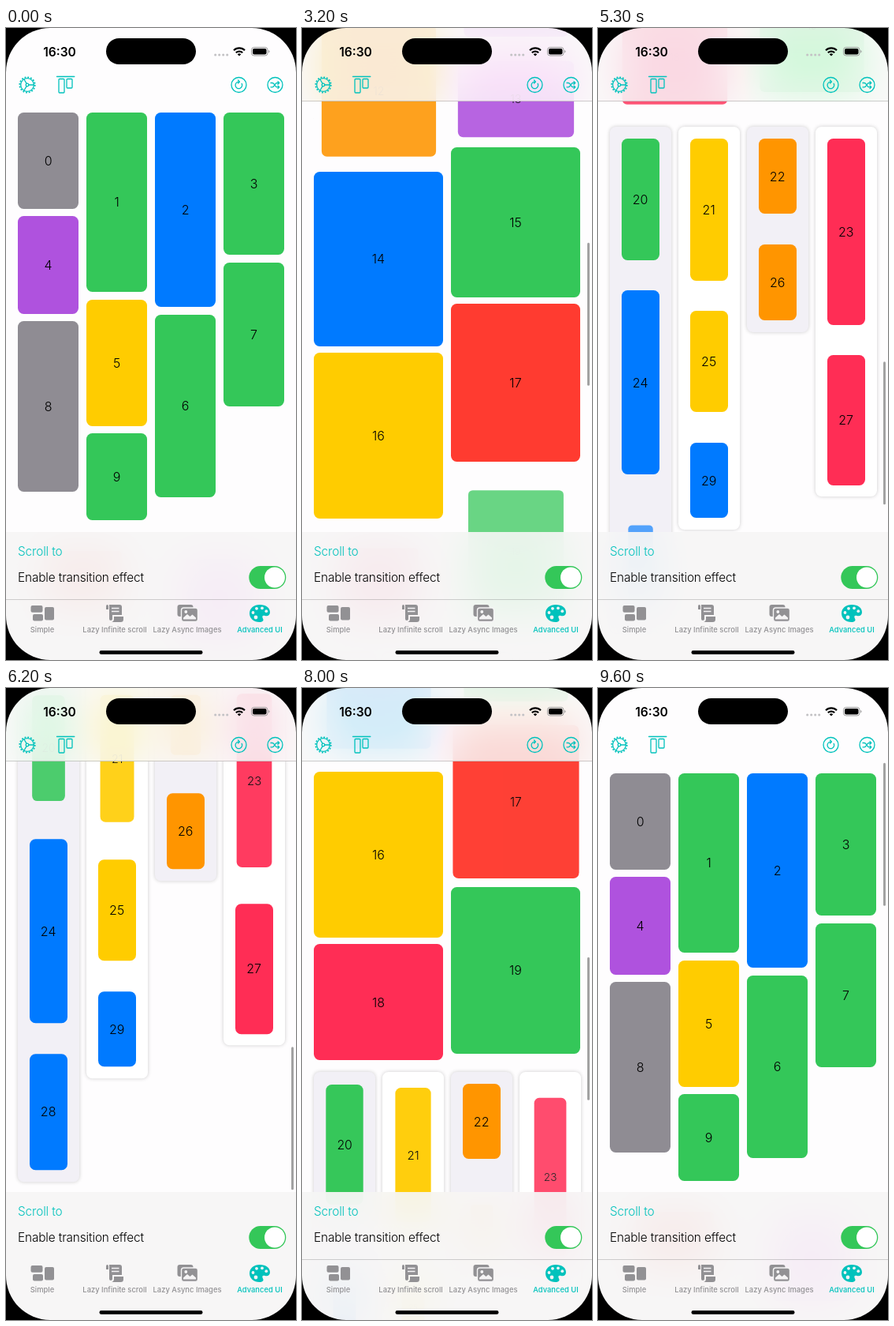
These frames come from a looping animation (368x800 px, 9700 ms). An HTML page:

```html
<!DOCTYPE html>
<html lang="en">
<head>
<meta charset="utf-8">
<title>Grid scroll</title>
<style>
  html, body { margin: 0; width: 100%; height: 100%; overflow: hidden; background: #000; }
  #phone { position: relative; width: 368px; height: 800px; overflow: hidden; background: #fefdfe;
    font: 300 16px Inter, "Liberation Sans", sans-serif; color: #000; }
  #phone > *, #list > * { position: absolute; box-sizing: border-box; }
  #list { left: 0; top: 0; }
  .tile { display: flex; align-items: center; justify-content: center; border-radius: 7.5px; }
  .card { border-radius: 7.5px; box-shadow: 0 0 5px rgba(0,0,0,.2); }
  .bar { left: 0; width: 368px; }
  #nav { top: 0; height: 92.5px; border-bottom: 1px solid rgba(0,0,0,.18); background: rgba(249,248,248,.85);
    -webkit-backdrop-filter: blur(26px) saturate(2.2); backdrop-filter: blur(26px) saturate(2.2); }
  #panel { top: 638px; height: 162px; background: rgba(247,246,246,.92);
    -webkit-backdrop-filter: blur(26px) saturate(1.8); backdrop-filter: blur(26px) saturate(1.8); }
  #line { left: 0; top: 723px; width: 368px; height: 1px; background: rgba(0,0,0,.17); }
  #thumb { left: 362.3px; top: 0; width: 3px; height: 181px; border-radius: 2px; background: rgba(0,0,0,.36); }
  #chrome { left: 0; top: 0; }
  #mask { inset: 0; border-radius: 56px; box-shadow: 0 0 0 60px #000; }
  .tab { font-size: 9.4px; font-weight: 500; text-anchor: middle; }
  .row { font-size: 15.4px; letter-spacing: -.15px; }
</style>
</head>
<body>
<div id="phone">
  <div id="list"></div>
  <div id="nav" class="bar"></div>
  <div id="panel" class="bar"></div>
  <div id="line"></div>
  <div id="thumb"></div>
  <svg id="chrome" width="368" height="800">
    <text x="68" y="35.5" font-size="15.6" font-weight="600" text-anchor="middle">16:30</text>
    <rect x="127" y="13" width="114" height="33" rx="16.5"/>
    <path d="M265.7 34h16" stroke="#c4c3c6" stroke-width="3.2" stroke-linecap="round" stroke-dasharray="0 5"/>
    <path d="M289 28.2a10 10 0 0 1 14 0M291.8 31.3a6 6 0 0 1 8.4 0" fill="none" stroke="#000" stroke-width="2.1"/>
    <path d="M293.7 33.2a3.4 3.4 0 0 1 4.6 0l-2.3 2.4z"/>
    <rect x="311.5" y="24.5" width="20.5" height="10.5" rx="3.2" fill="none" stroke="#999"/>
    <rect x="313" y="26" width="17.5" height="7.5" rx="2"/>
    <path d="M333.3 28v3.6q1.3-.6 1.3-1.8t-1.3-1.8" fill="#999"/>

    <g fill="none" stroke="#00c2bc" stroke-width="1.3" stroke-linecap="round" stroke-linejoin="round">
      <g transform="translate(27 72)">
        <circle r="8.3"/>
        <circle r="9.7" stroke-width="1.8" stroke-linecap="butt" stroke-dasharray="1.9 1.91"/>
        <circle r="1.8"/>
        <path d="M1.8 0H8M-.9-1.6-4-7M-.9 1.6-4 7"/>
      </g>
      <path d="M64.5 61.5h22.3"/>
      <rect x="67" y="64.5" width="7" height="17.5" rx="1"/>
      <rect x="77" y="64.5" width="7" height="11.5" rx="1"/>
      <g transform="translate(295.5 72)">
        <circle r="9.5"/>
        <path d="M3.7-1.6A4.3 4.3 0 1 1 .3-3.9M-1-6l2 2.1-2 2"/>
      </g>
      <g transform="translate(341.5 72)">
        <circle r="9.5"/>
        <path d="M-5.5-2.5h2C-.8-2.5-.3 2.8 2.3 2.8H5M-5.5 2.8h2C-.8 2.8-.3-2.5 2.3-2.5H5M3.5-4.3 5.3-2.5 3.5-.8M3.5 1.1 5.3 2.8 3.5 4.6"/>
      </g>
    </g>

    <text class="row" x="15" y="667.5" fill="#00c2bc">Scroll to</text>
    <text class="row" x="15" y="700.5">Enable transition effect</text>
    <rect x="308.3" y="681" width="47" height="29" rx="14.5" fill="#34c759"/>
    <circle cx="341" cy="695.5" r="13" fill="#fff"/>

    <g fill="#929194">
      <rect x="31.5" y="731" width="15" height="8.7" rx="2"/>
      <rect x="49" y="733" width="12" height="16.5" rx="2"/>
      <rect x="34" y="742" width="13" height="8.5" rx="2"/>
      <path d="M131 730h13q3 0 3 3v10h-12v5q0 2-2 2t-2-2zM127 732q0-2 1.5-2t1.5 2v4h-3zM137 745h12v3.5q0 3.5-3.5 3.5H134q3-1 3-4z"/>
      <path d="M134 734.5h9.5M134 738.5h9.5" stroke="#f5f4f5" stroke-width="1.4"/>
      <rect x="217.5" y="730" width="20" height="15" rx="3"/>
      <rect x="222.5" y="734" width="21" height="17.5" rx="3" stroke="#f5f4f5" stroke-width="1.4"/>
      <path d="M225 748.5v-2l5-4.5 3.5 3 3-2.5 4.5 4v2z" fill="#f5f4f5"/>
      <circle cx="228.3" cy="739" r="1.9" fill="#f5f4f5"/>
      <text class="tab" x="46" y="765.3">Simple</text>
      <text class="tab" x="138" y="765.3">Lazy Infinite scroll</text>
      <text class="tab" x="230" y="765.3">Lazy Async Images</text>
    </g>
    <g fill="#00c2bc">
      <path d="M322 730c8 0 13 4 13 9.5 0 4-3 5.5-6.5 4.5-3-.8-4 1-2.5 3.5 1.5 2.8-.5 4.500-4.500 4.500-7 0-12.500-4.500-12.500-11s5.500-11 13-11z"/>
      <g fill="#f5f4f5">
        <circle cx="313.5" cy="740" r="1.9"/><circle cx="318" cy="734.8" r="1.9"/>
        <circle cx="325" cy="734.3" r="1.9"/><circle cx="330.3" cy="738.2" r="1.9"/>
        <circle cx="317" cy="746" r="2.4"/>
      </g>
      <text class="tab" x="322" y="765.3">Advanced UI</text>
    </g>
    <rect x="118.5" y="788" width="131" height="4.7" rx="2.3"/>
  </svg>
  <div id="mask"></div>
</div>
<script>
const $ = id => document.getElementById(id);
const LOOP = 9700, TOP = 92, BOTTOM = 638, END = 2228;
const colors = { g: '#34c759', b: '#007aff', y: '#ffcc00', o: '#ff9500', r: '#ff3b30',
                 p: '#ff2d55', v: '#af52de', n: '#8f8c93' };
const sections = [
  { y: 106.6, cols: 4, x: 14.7, w: 77.8, pitch: 87, gap: 9.4, fill: 'ngbgvyggng',
    h: [122, 227.5, 246.5, 180.5, 123.5, 160, 231, 182.5, 216, 110.5] },
  { y: 638, cols: 2, x: 14.7, w: 164.6, pitch: 174, gap: 7.6, fill: 'rvovbgyrpg',
    h: [120, 171, 189.4, 107.5, 221.6, 190.4, 210.4, 200.2, 147.5, 211] },
  { y: 1587, cols: 4, x: 29.5, w: 48.3, pitch: 87, gap: 38.7, fill: 'gyopbyopbb', pad: 14.8,
    h: [153.5, 179.5, 95, 235.5, 233, 128, 96.5, 164.5, 147, 95.5] }
];
const tiles = [];

function box(cls, x, y, w, h, background) {
  const el = document.createElement('div');
  el.className = cls;
  Object.assign(el.style, { left: x + 'px', top: y + 'px', width: w + 'px', height: h + 'px', background });
  $('list').append(el);
  return el;
}

for (const { y, cols, x, w, pitch, gap, fill, pad, h } of sections) {
  const next = Array(cols).fill(y);
  const placed = h.map((height, i) => {
    const c = i % cols, top = next[c];
    next[c] += height + gap;
    return [x + c * pitch, top, w, height, colors[fill[i]]];
  });
  if (pad) next.forEach((bottom, c) => box('card', x + c * pitch - pad, y - pad, w + 2 * pad,
    bottom - gap - y + 2 * pad, c % 2 ? '#fff' : '#f2f0f6'));
  for (const p of placed) {
    const el = box('tile', ...p);
    el.textContent = tiles.length;
    tiles.push({ el, y: p[1], h: p[3] });
  }
}

// time, scroll offset
const keys = [[900, 0], [1000, 8], [1300, 170], [1600, 336], [1700, 336], [1800, 341], [3200, 781],
  [5300, 1447], [6300, 1590], [6400, 1590], [7100, 1546], [8000, 1086], [9200, -14], [9500, -3],
  [9600, -1], [9700, -1]];
const slope = i => keys[i + 1] && keys[i] ? (keys[i + 1][1] - keys[i][1]) / (keys[i + 1][0] - keys[i][0]) : 0;
function tangent(i) {
  const a = slope(i - 1), b = slope(i);
  return a * b > 0 ? 2 * a * b / (a + b) : 0;
}

// Monotone cubic through the keys
function scrollAt(t) {
  if (t <= keys[0][0]) return 0;
  const i = keys.findIndex(k => k[0] > t) - 1;
  const [t0, a] = keys[i], [t1, b] = keys[i + 1];
  const d = t1 - t0, u = (t - t0) / d, v = 1 - u;
  return a * v * v * (1 + 2 * u) + b * u * u * (3 - 2 * u)
    + d * u * v * (tangent(i) * v - tangent(i + 1) * u);
}

const smooth = u => { u = Math.min(1, Math.max(0, u)); return u * u * (3 - 2 * u); };

function draw(t) {
  const s = scrollAt(t);
  $('list').style.transform = `translateY(${-s}px)`;
  for (const { el, y, h } of tiles) {
    const above = smooth((TOP - y + s) / h), below = smooth((y + h - s - BOTTOM) / h);
    const k = 1 - .2 * above - .4 * below;
    el.style.transform = k < 1 ? `scale(${k})` : '';
    el.style.opacity = k;
  }
  $('nav').style.display = s > 1 ? '' : 'none';
  $('line').style.display = END - s > 723 ? '' : 'none';
  $('thumb').style.display = t >= 1000 ? '' : 'none';
  $('thumb').style.transform = `translateY(${95 + s * .2262}px)`;
}

const start = performance.now();
function frame() {
  const t = (performance.now() - start) % LOOP;
  draw(Math.floor(t / 100) * 100);
  requestAnimationFrame(frame);
}
frame();
</script>
</body>
</html>
```
